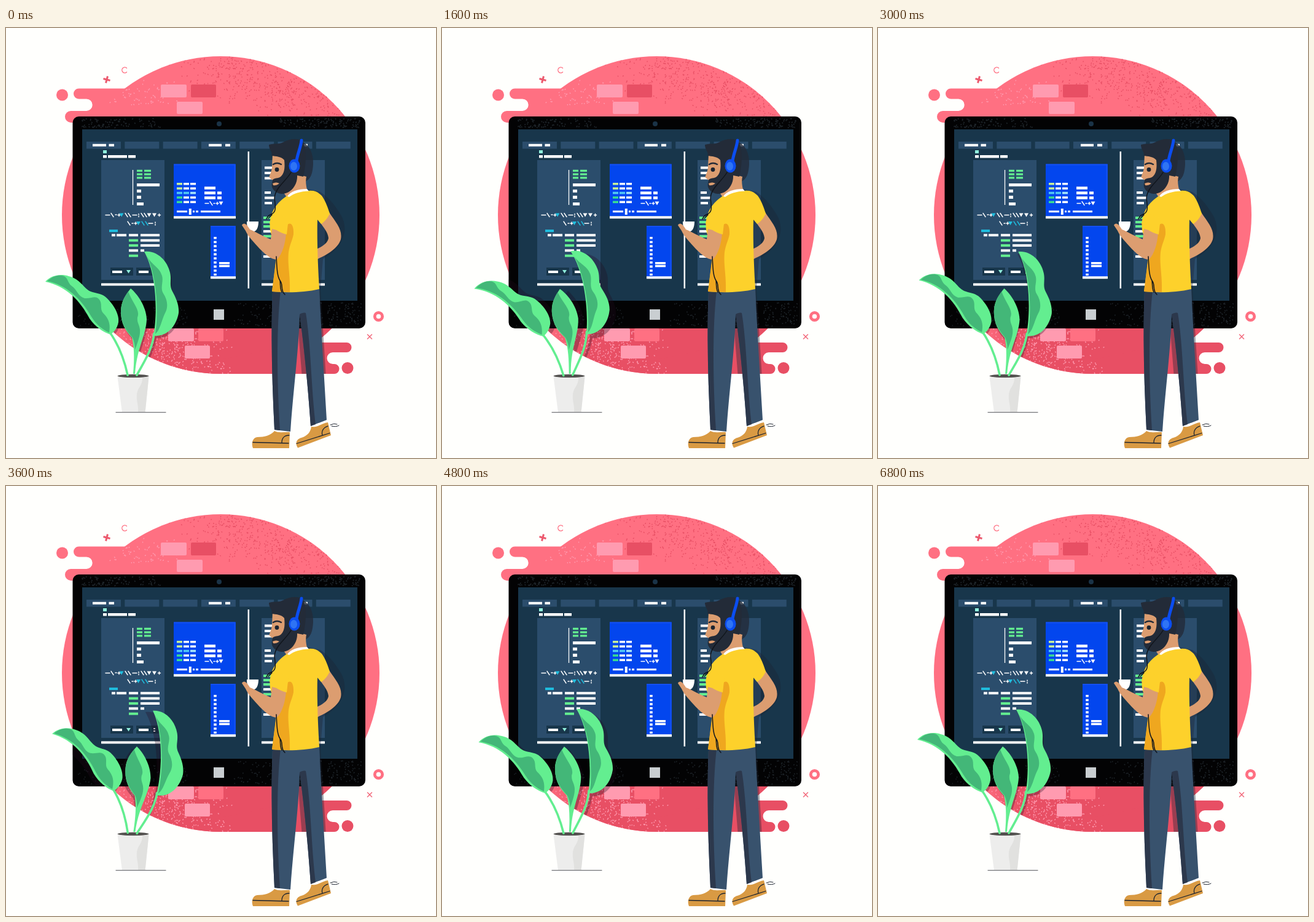
Write an HTML page that moves like this. It is 700 px wide and 700 px high and loops after 7 s.

```html
<!DOCTYPE html>
<html lang="en">
<head>
<meta charset="utf-8">
<title>Developer at the big screen</title>
<style>
  html, body { margin: 0; width: 100%; height: 100%; overflow: hidden; background: #fffffd; }
  svg { display: block; width: 100vw; height: 100vh; }
  .line { fill: none; stroke-linecap: round; stroke-linejoin: round; }
  .bars { fill: none; stroke: #fff; stroke-width: 4; }
  .green { stroke: #63ee90; }
  .cyan { stroke: #1fbfe0; }
  .speck { fill: none; stroke-linecap: round; }
</style>
</head>
<body>
<svg viewBox="0 0 700 700">
  <defs>
    <linearGradient id="redFade" gradientUnits="userSpaceOnUse" x1="165" x2="235" y1="0" y2="0">
      <stop stop-color="#ff7082"/><stop offset="1" stop-color="#e84f64"/>
    </linearGradient>
    <clipPath id="disc"><circle cx="349.5" cy="304.5" r="258.5"/></clipPath>
    <clipPath id="scene">
      <circle cx="349.5" cy="304.5" r="258.5"/>
      <rect x="108.500" y="144" width="476.500" height="345" rx="10"/>
      <path d="M349 489H522V563H349Z"/>
    </clipPath>
    <g id="stems" class="line">
      <path d="M168 494Q189 523 198 565M241 497C239 522 225 543 213 565"/>
    </g>
    <path id="leftLeaf" d="M64 413C74 402 90 400 102 404C122 409 126 424 138 429C146 432 154 432 161 437C172 446 185 464 183 479C181 489 176 495 170 499C158 495 146 487 136 473C121 444 98 420 64 413Z"/>
    <path id="midLeaf" d="M203 424C214 433 228 453 229 474C228 501 213 520 210 563H207C209 538 209 520 205 504C194 492 187 481 187 461C187 445 195 434 203 424Z"/>
    <path id="rightLeaf" d="M225 364C244 361 262 377 267 398C270 411 265 418 271 429C277 440 282 451 281 464C277 486 262 503 240 501C246 470 247 404 225 364Z"/>
  </defs>

  <!-- backdrop -->
  <g fill="#ff7082">
    <circle cx="349.5" cy="304.5" r="258.5"/>
    <path d="M215 98.500H118.500a8.500 8.500 0 0 0 0 17H131a9.700 9.700 0 0 1 0 19.400H105.500a9.500 9.500 0 0 0 0 19H215Z"/>
    <circle cx="91.500" cy="109" r="9.500"/>
  </g>
  <rect x="90" y="480" width="520" height="90" fill="url(#redFade)" clip-path="url(#disc)"/>
  <path d="M480 512H554.500a8 8 0 0 1 0 16H532a9.500 9.500 0 0 0 0 19H534.500a8 8 0 0 1 0 16H349V540Z" fill="#e84f64"/>
  <circle cx="556" cy="553.500" r="9.500" fill="#e84f64"/>
  <g id="discSpecks" clip-path="url(#disc)"></g>
  <g fill="#ff9bb0">
    <rect x="252" y="92" width="42" height="21" rx="2"/>
    <rect x="278" y="120" width="42" height="20" rx="2"/>
    <rect x="264" y="489" width="42" height="21" rx="2"/>
    <rect x="291" y="517" width="41" height="21" rx="2"/>
  </g>
  <rect x="301" y="92" width="41" height="21" rx="2" fill="#e84f64"/>
  <rect x="313" y="489" width="41" height="21" rx="2" fill="#ff7082"/>
  <g class="line" stroke="#ff7082">
    <path d="M158.500 82.500L169.500 85.500M165.500 78.500L162.500 89.500" stroke="#ec5a6e" stroke-width="3" stroke-linecap="butt"/>
    <path d="M196.500 65.300a4.500 4.500 0 1 0 0 6.400" stroke-width="1.400"/>
    <circle cx="606.500" cy="469.500" r="6.200" stroke-width="4.800"/>
    <path d="M588.500 499l7 7m0-7l-7 7" stroke="#f2687a" stroke-width="1.500"/>
  </g>

  <!-- monitor -->
  <rect x="108.500" y="144" width="476.500" height="345" rx="10" fill="#030304"/>
  <g id="bezelSpecks"></g>
  <rect x="124" y="165" width="448" height="279" fill="#18364b"/>
  <circle cx="347" cy="156" r="4" fill="#1a3347"/>
  <rect x="338" y="458" width="17" height="17" fill="#c9ced1"/>
  <g fill="#2b4d6c">
    <g id="tabs"></g>
    <path d="M155 215h103v195h-103zM416 215h103v195h-103z"/>
  </g>
  <path d="M170 390h37v13h-37zM212 390h37v13h-37z" fill="#18364b"/>
  <path d="M273 221.500h101v85h-101zM333 322h41v83h-41z" fill="#0346ee"/>
  <path d="M274 222.500h98.500V306M334 323h38.500V404" class="line" stroke="#1450f1" stroke-width="2"/>
  <g class="bars">
    <path d="M141 190.800h22m4.500 0h8.500M330 190.800h21m6 0h8M454 190.800h22m6 0h9"/>
    <path d="M158 209.300h6m2 0h31m2 0h12" stroke-width="4.500"/>
    <path d="M158 201.500h6" stroke="#90efdc" stroke-width="5"/>
    <path d="M155 417.500h103M416 417.500h103M273 308.300h101M333 406.300h41"/>
    <path d="M206.500 231v57" stroke-width="1.300"/>
    <path d="M394.800 201v223" stroke-width="2.500"/>
    <path class="green" d="M213 232.300h9m3 0h11M213 238.100h9m3 0h11M213 243.900h9m3 0h11" stroke-width="3.200"/>
    <path d="M213 255.300h37M213 265.300h7M213 275.500h7M213 286.300h11" stroke-width="4.800"/>
    <path class="cyan" d="M168 330.200h14"/>
    <path d="M172 337.300h6m2 0h16m4 0h15m4 0h31M219 345.700h31M219 354h31M200 362.300h15m4 0h6M173 397h16M216 397h16"/>
    <path class="green" d="M200 345.700h15M200 354h15M200 370.800h15"/>
    <path d="M240 395h3M240 399h3" stroke-width="2"/>
    <path d="M323 260.500h18M323 268.500h18m3 0h7M323 276.500h18m3 0h7" stroke-width="4.500"/>
    <path d="M278 298.800h17m9 0h3m2 0h4m4 0h32" stroke-width="3"/>
    <path d="M299.800 294v10"/>
    <path d="M340.500 340v63" stroke-width="4.500" stroke-dasharray="3.600 3.050"/>
    <path d="M347 382.700h17M347 387.500h17" stroke-width="3.500"/>
    <path d="M421 227.500h14M421 236h14M421 244.500h14M421 268h10M421 276.500h16M421 285h12M419 331h14M419 354h14M419 372h14"/>
    <path class="green" d="M419 309h13M419 316h13M419 323h13M419 339h13M419 347h13M419 363h13"/>
  </g>
  <g id="cells"></g>
  <g class="line" stroke="#fff" stroke-width="1.400" stroke-linecap="butt">
    <path d="M162 304.500h7m2-3l4 6m3-3.500h2m2 .500h4m-2-2v4M194 301.500l4 6m1-6l4 6m3-3h7m3-2v1.500m0 2v1.500m4-6l4 6m1-6l4 6M247.500 304.500h4m-2-2v4"/>
    <path d="M198 315l4 6m3-3h2m2 0h4m-2-2v4M232 318h7m4-2v1.500m0 2v1.500"/>
    <path d="M221 315l4 6m2-6l4 6" class="cyan"/>
    <path d="M324 285.500h6m2-3l4 6m2-3h2m2 0h4m-2-2v4"/>
  </g>
  <path d="M229.500 301.500h7l-3.500 6zM238 301.500h7l-3.500 6zM346.500 282.500h7l-3.500 6z" fill="#fff"/>
  <path d="M184.500 301.500h7l-3.500 6zM212 315h7l-3.500 6z" fill="#1fbfe0"/>
  <path d="M196 394h7l-3.500 5.500z" fill="#90efdc"/>

  <!-- cast shadows -->
  <g clip-path="url(#scene)">
    <g fill="#210d20" stroke="#210d20" stroke-width="4" opacity=".3" transform="translate(2 4)">
      <use href="#stems" fill="none"/>
      <g stroke="none"><use href="#leftLeaf"/><use href="#midLeaf"/><use href="#rightLeaf"/></g>
    </g>
    <path d="M490 262L512 267C530 280 536 290 545 304C560 330 548 358 516 376L512 424L521 570H482L470 420Z" fill="#1c2433" opacity=".38"/>
    <path d="M476 183C494 187 501 205 500 222C499 240 495 247 485 251Z" fill="#222b39" opacity=".8"/>
  </g>

  <!-- plant -->
  <ellipse cx="207" cy="566.500" rx="25.500" ry="2.800" fill="#52504e"/>
  <g id="plant">
    <use href="#stems" stroke="#63ee90" stroke-width="3.600"/>
    <g fill="#63ee90"><use href="#leftLeaf"/><use href="#midLeaf"/><use href="#rightLeaf"/></g>
    <g fill="#43b778">
      <path d="M67 412C76 404 84 402 91 403C102 405 99 414 107 420C116 426 117 437 128 440C138 441 145 435 151 441C158 448 152 457 158 464C165 471 171 479 168 496C156 490 147 483 139 470C122 440 98 418 67 412Z"/>
      <path d="M199 429C194 436 187 447 187 462C187 481 195 491 206 504C209 511 210 517 210 524C214 512 219 501 218 491C217 482 213 480 214 471C219 459 206 448 199 429Z"/>
      <path d="M229 370C234 383 250 390 253 401C258 411 250 422 256 432C262 441 265 453 259 464C253 476 251 492 243 498C248 466 247 408 229 370Z"/>
    </g>
  </g>
  <path d="M181.500 567.500C194 570 221 570 232.500 567.500L226.500 626H189Z" fill="#ededec"/>
  <path d="M232.500 567.500C230 568.500 225 569 222 569.200C222 583 214 585 213 597C212 607 216 614 215 626H226.500Z" fill="#e1e1df"/>
  <path d="M179 625.700h81" class="line" stroke="#737478" stroke-width="1.200"/>

  <!-- man: legs and shoes -->
  <path d="M437 648l1 12 24 2 1-12zM495 643l2 9 26-7-1-11z" fill="#fff"/>
  <path d="M437 656C444 660 455 657 462 658L461 684H402C399 677 401 667 409 666C421 666 431 663 437 656ZM497 649C506 651 516 643 524 642L529 663L475 683.500C470 676 473 669 481 667C491 664 496 657 497 649Z" fill="#d99a43"/>
  <g class="line" stroke="#1d2430" stroke-width="1.300">
    <path d="M402 674.500L460 676M449 675C449 667 454 663 461 663M473 676.500L527 659.500M515 663C513 656 517 650 524 648"/>
    <path d="M528 646Q534 643 539 645M530 648Q537 650 542 647" stroke-width="1"/>
  </g>
  <path d="M434 425L510 422C513 490 518 570 522 638L496 648C492 590 486 525 478 466C477 520 467 595 463 657L437 654C433 575 431 500 434 425Z" fill="#38526d"/>
  <path d="M434 427L447 428C441 480 440 560 446 655L437 654C433 575 431 500 434 427ZM478 466C481 464 485 463 488 464C496 510 497 590 504 645L496 648C492 590 486 525 478 466Z" fill="#2c384c"/>

  <!-- man: torso and arms -->
  <path d="M511 316L526 300C538 318 548 328 545 344C540 360 521 370 505 377V360C515 356 524 350 525 342C524 332 517 325 511 316Z" fill="#dc9d70"/>
  <path d="M452 268L474 238L489 242C487 251 489 260 492 270L460 280Z" fill="#dc9d70"/>
  <path d="M458 273C467 267 481 265 493 265C503 264 509 268 514 273C521 283 524 293 527 302C524 309 519 315 513 319L507 312C506 345 508 390 510 425C485 431 455 431 433 429L440 376C438 357 434 345 430 329C427 303 439 285 458 273Z" fill="#fdd12b"/>
  <path d="M456 323C462 314 469 319 468 336C466 346 462 352 460 365C458 385 463 402 462 430L433 429L440 372L453 344Z" fill="#efa71f"/>
  <path d="M458 274C463 266 475 262 490 262L493 265.500C479 266 469 269 461 275Z" fill="#fff"/>
  <path d="M392 315H411C411 326 407 333 399 332C394 330 392 324 392 315Z" fill="#fff"/>
  <path d="M384 321C388 315 393 321 397 328C405 331 418 339 431 344L433 327L456 333C455 350 450 368 441 377C431 377 420 367 409 355C401 346 394 339 390 330Z" fill="#dc9d70"/>
  <path d="M429 318C436 327 446 334 457 336L460 310L435 300Z" fill="#fdd12b"/>

  <!-- man: head -->
  <path d="M434 205L460 198L478 220L474 250L450 262L434 248L428.500 243C429 239 433 233 433 226Z" fill="#dc9d70"/>
  <path d="M434 247C439 243 445 246 449 240C454 234 454 224 453 215C448 209 440 209 432 208C435 202 428 199 428 190C437 187 444 190 451 186C462 180 476 179 482 184C491 196 488 226 484 242L474 240C475 256 463 270 449 270C437 269 431 260 433 253Z" fill="#232b38"/>
  <path d="M434 253Q440 250 445 253Q440 257 435 256Z" fill="#dc9d70"/>
  <circle cx="441" cy="230.500" r="3.400" fill="#1c2430"/>
  <path d="M435 222Q441 218 448 222" class="line" stroke="#232b38" stroke-width="2.500"/>
  <path d="M481 183C480 194 475 203 473 216" class="line" stroke="#0b4df0" stroke-width="5" stroke-linecap="butt"/>
  <ellipse cx="469.500" cy="224.500" rx="9" ry="11" fill="#0b4df0"/>
  <ellipse cx="468.500" cy="225" rx="5.500" ry="7" fill="#2f74f4"/>
  <g class="line" stroke="#10151c" stroke-width="1.500">
    <path d="M464 235C456 249 438 260 437 277C439 292 440 300 432 303C426 305 425 309 424 311M433 304L427 310"/>
    <path d="M440 372C441 389 441 403 446 411C452 418 446 427 454 434M446 411C447 418 446 425 449 430"/>
  </g>
</svg>
<script>
const byId = id => document.getElementById(id);

let seed = 7;
const random = () => (seed = seed * 16807 % 2147483647) / 2147483647;

// Scatters dots in a box; `keep` gives the chance of a dot at (u, v) in 0..1.
function scatter(id, count, x, y, w, h, color, size, keep = () => 1) {
  let d = '';
  for (let i = 0; i < count; i++) {
    const u = random(), v = random();
    if (random() < keep(u, v))
      d += `M${(x + u * w).toFixed(1)} ${(y + v * h).toFixed(1)}l${(random() * 1.6 - .8).toFixed(1)} .6`;
  }
  byId(id).innerHTML += `<path class="speck" d="${d}" stroke="${color}" stroke-width="${size}"/>`;
}

scatter('discSpecks', 1300, 255, 46, 300, 98, '#e84f64', 1.4, (u, v) => Math.max(0, 1 - Math.abs(v - u * .75 + .02) * 1.6) * Math.min(1, u * 3));
scatter('discSpecks', 190, 160, 65, 120, 60, '#ff9bb0', 1.4, (u, v) => v * (1 - Math.abs(u - .5)));
scatter('discSpecks', 950, 185, 489, 210, 75, '#ff9bb0', 1.4, u => Math.max(0, 1 - Math.abs(u - .32) * 1.7));
scatter('bezelSpecks', 130, 122, 147, 130, 15, '#1d2328', 1.7, u => 1 - u * .7);
scatter('bezelSpecks', 170, 445, 147, 132, 15, '#1d2328', 1.7, u => .3 + u * .7);
scatter('bezelSpecks', 240, 118, 448, 180, 38, '#171c20', 1.5, (u, v) => .2 + v * .6);
scatter('bezelSpecks', 400, 370, 447, 208, 38, '#1d2328', 1.5, u => .2 + u * .7);

const rect = (x, y, w, h, fill) =>
  `<rect x="${x}" y="${y}" width="${w}" height="${h}"${fill ? ` fill="${fill}"` : ''}/>`;

for (let i = 0; i < 7; i++) byId('tabs').innerHTML += rect(131 + i * 62.3, 185, 56, 11.5);

['#c6f09a', '#c6f09a', '#52c8f5', '#39dd92', '#39dd92'].forEach((color, row) => {
  for (let col = 0; col < 3; col++)
    byId('cells').innerHTML += rect(278 + col * 11, 252 + row * 7.4, 9, 3.5,
      col && row !== 2 ? '#fff' : col === 2 ? '#a5e4fa' : color);
});

// Sway keys: [time in ms, angle in degrees], eased between neighbours.
const sway = [[0, 0], [2000, -4.9], [3650, 4], [5550, -4.6], [6800, 0], [7000, 0]];

function angleAt(time) {
  const i = sway.findIndex(([end]) => time < end);
  const [t0, a0] = sway[i - 1], [t1, a1] = sway[i];
  const p = (time - t0) / (t1 - t0);
  return a0 + (a1 - a0) * p * p * (3 - 2 * p);
}

const start = performance.now();
function draw() {
  const elapsed = (performance.now() - start) % 7000;
  const time = Math.floor(elapsed / 200) * 200;
  byId('plant').setAttribute('transform', `rotate(${angleAt(time).toFixed(3)} 207 568)`);
  requestAnimationFrame(draw);
}
draw();
</script>
</body>
</html>
```
